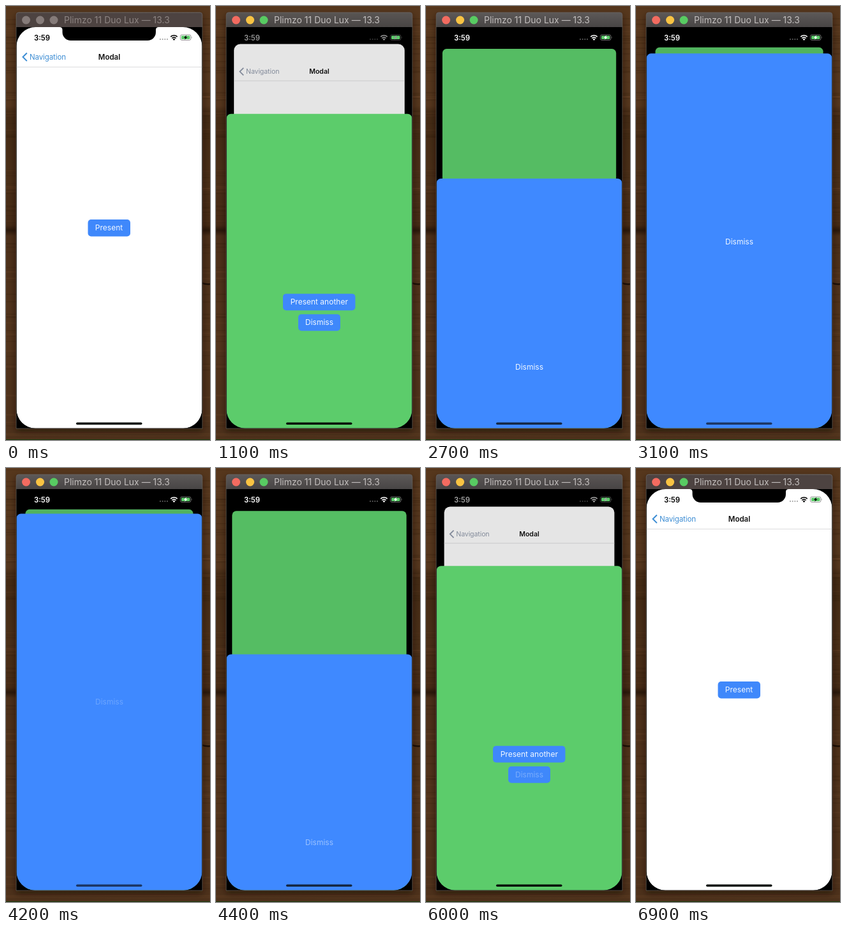
An HTML page for the animation above (7000 ms loop, 320 px wide and 679 px high).

```html
<!DOCTYPE html>
<html lang="en">
<head>
<meta charset="utf-8">
<title>Modal sheets</title>
<style>
  html, body { margin: 0; width: 100%; height: 100%; overflow: hidden; background: #4a2e18; }
  svg { display: block; width: 320px; height: 679px; font-family: Inter, Roboto, sans-serif; }
  .btn { fill: #3f88fb; }
  .label { font-size: 12px; text-anchor: middle; fill: #f2f8ff; }
</style>
</head>
<body>
<svg viewBox="0 0 320 679">
  <defs>
    <linearGradient id="wood" x2="0" y2="1">
      <stop offset="0" stop-color="#56371d"/>
      <stop offset=".23" stop-color="#54361d"/>
      <stop offset=".245" stop-color="#432a14"/>
      <stop offset=".4" stop-color="#4a2f18"/>
      <stop offset=".505" stop-color="#452a15"/>
      <stop offset=".517" stop-color="#2b190b"/>
      <stop offset=".53" stop-color="#4b2f19"/>
      <stop offset=".75" stop-color="#51341c"/>
      <stop offset="1" stop-color="#4d311b"/>
    </linearGradient>
    <linearGradient id="bar" x2="0" y2="1">
      <stop offset="0" stop-color="#5d5958"/>
      <stop offset="1" stop-color="#484545"/>
    </linearGradient>
    <clipPath id="screen">
      <path d="M16.5 33H307.5V631a29 29 0 0 1-29 29.5H45.500a29 29 0 0 1-29-29.500Z"/>
    </clipPath>
    <filter id="soft" x="-20%" y="-10%" width="140%" height="120%">
      <feGaussianBlur stdDeviation="5"/>
    </filter>
  </defs>

  <rect width="320" height="679" fill="url(#wood)"/>
  <g id="grain" fill="none"></g>
  <path d="M306 433q8 3 14 2" stroke="#1d1007" stroke-width="2.500" fill="none"/>
  <rect x="15" y="14" width="294" height="652" rx="5" fill="#140a04" opacity=".55" filter="url(#soft)"/>
  <path d="M0 678.500H320" stroke="#183b10"/>

  <path d="M16 661V14a4 4 0 0 1 4-4H304a4 4 0 0 1 4 4V661Z" fill="#000"/>
  <path d="M16 33V14a4 4 0 0 1 4-4H304a4 4 0 0 1 4 4V33Z" fill="url(#bar)"/>
  <rect id="idle" x="16.500" y="11" width="291" height="22" rx="3" fill="#4d4341"/>
  <circle class="light" cx="31.500" cy="22" r="6.500"/>
  <circle class="light" cx="53.500" cy="22" r="6.500"/>
  <circle class="light" cx="75" cy="22" r="6.500"/>
  <text id="title" x="91" y="27" font-size="14">Plimzo 11 Duo Lux — 13.3</text>

  <g clip-path="url(#screen)">
    <g id="root">
      <rect class="card" width="291" height="628" fill="#fff"/>
      <path d="M0 62.500H291" stroke="#d4d4d6" stroke-width=".8"/>
      <g id="back">
        <path d="M16.300 40.500l-6.300 6.300 6.300 6.300" fill="none" stroke-width="2"/>
        <text x="20.500" y="51" font-size="11.500" letter-spacing="-.1" stroke="none">Navigation</text>
      </g>
      <text x="145.500" y="51" font-size="11.500" font-weight="600" text-anchor="middle" fill="#111">Modal</text>
      <rect class="btn" x="112" y="301" width="66.500" height="26.500" rx="5"/>
      <text class="label" id="present" x="145" y="318.300">Present</text>
      <rect class="card shade" width="291" height="628"/>
    </g>

    <path d="M84 33q4.500 0 4.500 4.500V41a13 13 0 0 0 13 13H222a13 13 0 0 0 13-13V37.500q0-4.500 4.500-4.500Z" fill="#000"/>

    <g id="status">
      <text x="44" y="53.500" font-size="11.300" font-weight="600">3:59</text>
      <g opacity=".4">
        <circle cx="242" cy="52" r="1"/><circle cx="245.700" cy="52" r="1"/>
        <circle cx="249.400" cy="52" r="1"/><circle cx="253" cy="52" r="1"/>
      </g>
      <g class="line" fill="none" stroke-width="1.700">
        <path d="M258.300 48.200a7.200 7.200 0 0 1 10.400 0"/>
        <path d="M260.300 50.500a4.500 4.500 0 0 1 6.400 0"/>
      </g>
      <path d="M263.500 54l-1.900-2a2.700 2.700 0 0 1 3.800 0Z"/>
      <rect class="line" x="273.500" y="45" width="16.500" height="8.500" rx="2.500" fill="none" stroke-width=".8" opacity=".5"/>
      <path d="M291 47.700q1.300 1.500 0 3Z" opacity=".5"/>
      <rect x="275" y="46.400" width="13.500" height="5.700" rx="1.300" fill="#5ccb6a"/>
      <path d="M283.200 45.800l-4.700 4h2.700l-1 3 4.700-4h-2.700Z"/>
    </g>

    <g id="green">
      <rect class="card" width="291" height="700" fill="#5ccc6b"/>
      <rect class="btn" x="88.500" y="281.500" width="113.500" height="26" rx="5"/>
      <text class="label" id="another" x="145.300" y="298.700">Present another</text>
      <rect class="btn" x="112.500" y="313.500" width="66" height="26" rx="5"/>
      <text class="label" id="dismissGreen" x="145.500" y="330.800">Dismiss</text>
      <rect class="card shade" width="291" height="700"/>
    </g>

    <g id="blue">
      <rect class="card" width="291" height="700" fill="#3f89ff"/>
      <text class="label" id="dismissBlue" x="145.500" y="298.700">Dismiss</text>
    </g>
    <rect id="home" x="110" y="651.500" width="103.500" height="3.500" rx="1.700"/>
  </g>
  <path d="M16 661V14a4 4 0 0 1 4-4H304a4 4 0 0 1 4 4V661Z" fill="none" stroke="#6d6664" stroke-width=".8" opacity=".8"/>
</svg>
<script>
  const LOOP = 7000, STEP = 100;
  const SHOW_GREEN = 850, SHOW_BLUE = 2525, HIDE_BLUE = 4300, HIDE_GREEN = 5950;
  const FOCUS = 600;
  const TOP = 33, SHEET = 71.500, STACK = 64.800, BOTTOM = 661, SHRINK = 0.096;

  const el = id => document.getElementById(id);
  const all = sel => [...document.querySelectorAll(sel)];
  const clamp = x => Math.max(0, Math.min(1, x));
  const mix = (a, b, p) => a + (b - a) * p;
  const rgb = (a, b, p) => `rgb(${a.map((v, i) => Math.round(mix(v, b[i], p)))})`;

  // Critically damped spring from 0 to 1
  function spring(ms) {
    if (ms <= 0) return 0;
    const x = 0.013 * ms;
    return x > 9 ? 1 : 1 - (1 + x) * Math.exp(-x);
  }

  // A button label dims while held and recovers after release
  function press(id, t, at) {
    const held = clamp((t - at + 170) / 70) * (1 - clamp((t - at - 30) / 200));
    el(id).setAttribute('opacity', 1 - 0.75 * held);
  }

  function place(id, y, scale, radius, dim) {
    const g = el(id);
    g.setAttribute('transform', `translate(${16.5 + 145.5 * (1 - scale)} ${y}) scale(${scale})`);
    g.querySelectorAll('.card').forEach(c => c.setAttribute('rx', radius));
    const shade = g.querySelector('.shade');
    if (shade) shade.setAttribute('opacity', dim);
  }

  function drawGrain() {
    let seed = 17;
    const rnd = () => (seed = seed * 16807 % 2147483647) / 2147483647;
    let out = '';
    for (let i = 0; i < 90; i++) {
      const y = rnd() * 679, bend = rnd() * 12 - 6;
      out += `<path d="M0 ${y.toFixed(1)}q160 ${bend.toFixed(1)} 320 ${(bend / 2).toFixed(1)}" ` +
        `stroke="${rnd() < 0.6 ? '#2c190a' : '#765031'}" stroke-width="${(0.5 + rnd() * 2).toFixed(1)}" opacity=".17"/>`;
    }
    el('grain').innerHTML = out;
  }

  function draw(t) {
    const g = spring(t - SHOW_GREEN) - spring(t - HIDE_GREEN);
    const b = spring(t - SHOW_BLUE) - spring(t - HIDE_BLUE);
    const active = t >= FOCUS;

    place('root', mix(TOP, STACK, g) + 9 * b, 1 - SHRINK * (g + 0.85 * b), mix(30, 7, g), 0.12 * g);
    place('green', mix(BOTTOM, SHEET, g) - (SHEET - STACK) * b, 1 - SHRINK * b, 7, 0.12 * b);
    place('blue', mix(BOTTOM, SHEET, b), 1, 7, 0);

    const tint = rgb([62, 142, 212], [146, 155, 172], clamp(g * 1.2));
    el('back').setAttribute('fill', tint);
    el('back').setAttribute('stroke', tint);

    const ink = rgb([0, 0, 0], [255, 255, 255], g ** 3);
    el('status').setAttribute('fill', ink);
    all('.line').forEach(n => n.setAttribute('stroke', ink));
    el('home').setAttribute('fill', rgb([8, 14, 10], [28, 54, 100], b));

    const lights = active ? ['#f36b60', '#f8c343', '#58cb62'] : Array(3).fill('#857b79');
    all('.light').forEach((n, i) => n.setAttribute('fill', lights[i]));
    el('title').setAttribute('fill', active ? '#c2bebd' : '#8d8482');
    el('idle').setAttribute('opacity', active ? 1 - g : 1);

    press('present', t, SHOW_GREEN);
    press('another', t, SHOW_BLUE);
    press('dismissBlue', t, HIDE_BLUE);
    press('dismissGreen', t, HIDE_GREEN);
  }

  const start = performance.now();
  function tick() {
    const t = (performance.now() - start) % LOOP;
    draw(Math.floor(t / STEP) * STEP);
    requestAnimationFrame(tick);
  }
  drawGrain();
  tick();
</script>
</body>
</html>
```
